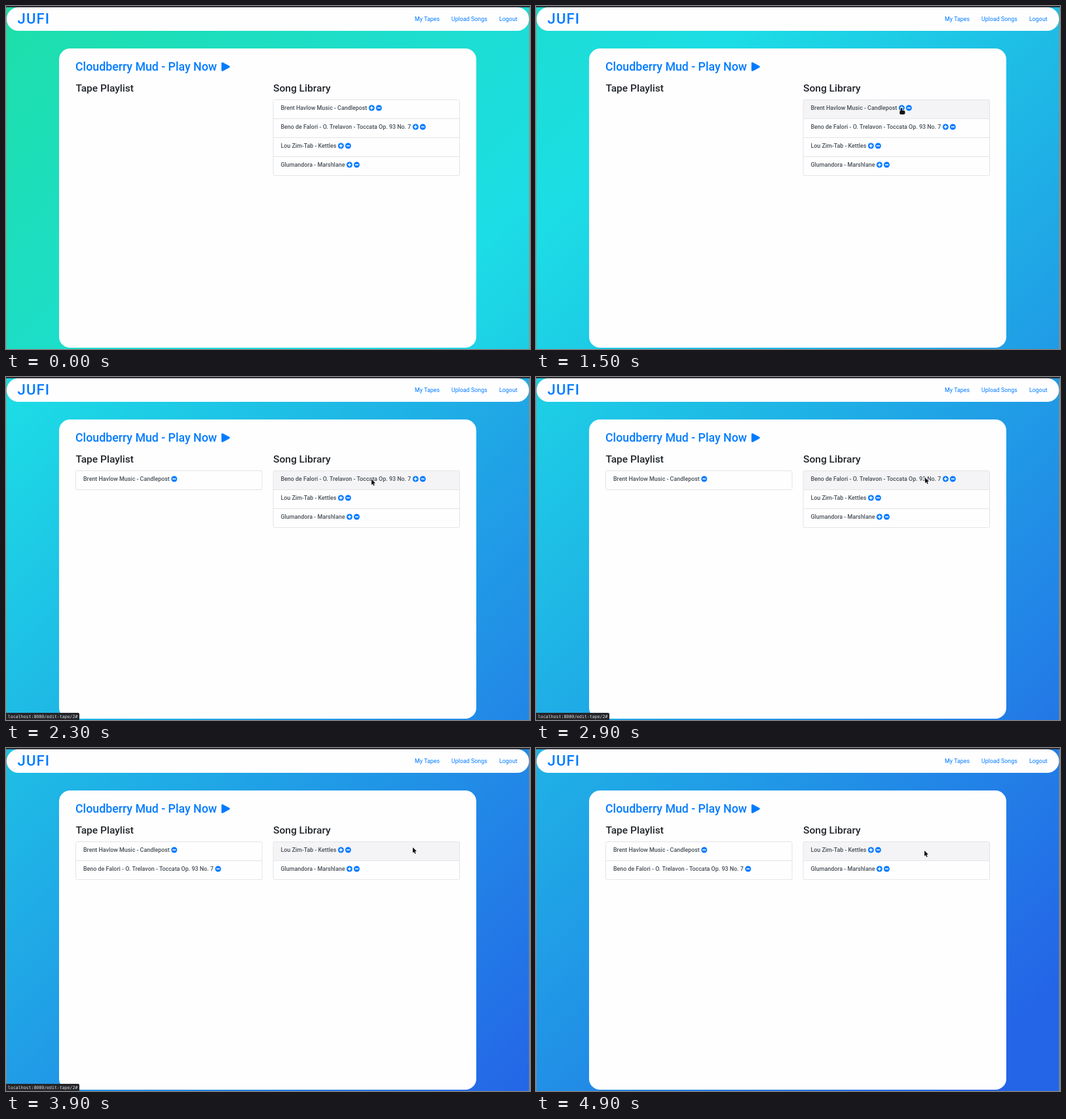
Write an HTML page with a canvas that moves like this. It is 800 px wide and 525 px high and loops after 5000 ms.

```html
<!DOCTYPE html>
<html lang="en">
<head>
<meta charset="utf-8">
<title>Tape editor</title>
<style>
html, body { margin: 0; width: 100%; height: 100%; overflow: hidden; }
canvas { display: block; width: 800px; height: 525px; }
</style>
</head>
<body>
<canvas id="stage" width="800" height="525"></canvas>
<script>
const ctx = document.getElementById('stage').getContext('2d');
const W = 800, H = 525, LOOP = 5000, STEP = 100;

// The page is laid out at 1440 px and shown at 800 px.
const REM = 16 * W / 1440;
const SANS = 'Roboto, sans-serif', MONO = '"DejaVu Sans Mono", monospace';
const BLUE = '#007bff', INK = '#212529', GREY = '#495057';
const LINE = '#e4e4e7', PAPER = '#fefeff', EDGE = 'rgba(150,144,124,.8)';

const songs = [
  'Brent Havlow Music - Candlepost',
  'Beno de Falori - O. Trelavon - Toccata Op. 93 No. 7',
  'Lou Zim-Tab - Kettles',
  'Glumandora - Marshlane'
];
const TAPE_X = 106.5, LIBRARY_X = 408;
const ROW = { top: 143.5, height: 29, width: 284.5, pad: 11.5, mid: 12.5 };

const ADDS = [1900, 3900];
const STATUS = { from: 1700, to: 4100 };

// Pointer: where it waits above the page, then each move it makes.
const ENTRY = { x: 620, y: -14 };
const moves = [
  { from: 400, ms: 300, x: 613, y: 35 },
  { from: 700, ms: 600, x: 558, y: 156.5 },
  { from: 2500, ms: 700, x: 621, y: 152 },
  { from: 4000, ms: 900, x: 593, y: 157 }
];

// Evenly spaced background stops, in page diagonals.
const tones = ['rgb(30,224,130)', 'rgb(28,221,229)', 'rgb(36,100,231)'];
const FIRST_TONE = -0.52, TONE_GAP = 1.34;

const clamp = v => Math.min(1, Math.max(0, v));
const mix = (a, b, k) => a + (b - a) * k;

function font(size, weight = 500, family = SANS) {
  ctx.font = `${weight} ${size}px ${family}`;
}

function text(str, x, y, size, color, weight, family) {
  font(size, weight, family);
  ctx.fillStyle = color;
  ctx.fillText(str, x, y);
}

function rect(x, y, w, h, color) {
  ctx.fillStyle = color;
  ctx.fillRect(x, y, w, h);
}

function panel(x, y, w, h, r, color) {
  ctx.beginPath();
  ctx.roundRect(x, y, w, h, r);
  ctx.fillStyle = color;
  ctx.fill();
}

// Distance from the start of a label to the middle of its first button.
function iconOffset(label) {
  font(REM);
  return ctx.measureText(label).width + 7;
}

function pointer(t) {
  if (t < moves[0].from) return null;
  return moves.reduce((p, m) => {
    const k = clamp((t - m.from) / m.ms);
    return { x: mix(p.x, m.x, k), y: mix(p.y, m.y, k) };
  }, ENTRY);
}

function background(t) {
  const s = t / 1000, shift = 0.42 * s - 0.0324 * s * s;
  const at = v => (v - shift) * (W + H) / 2;
  const a = at(FIRST_TONE), b = at(FIRST_TONE + TONE_GAP * (tones.length - 1));
  const g = ctx.createLinearGradient(a, a, b, b);
  tones.forEach((c, i) => g.addColorStop(i / (tones.length - 1), c));
  rect(0, 0, W, H, g);
  rect(W - 1.5, 2, 1.5, H, EDGE);
  rect(0, 2, 0.8, H, EDGE);
  rect(0, 0, W, 2, '#2c2c34');
}

function playIcon(x, y) {
  ctx.beginPath();
  ctx.moveTo(x, y - 5.5);
  ctx.lineTo(x + 10.3, y);
  ctx.lineTo(x, y + 5.5);
  ctx.closePath();
  ctx.lineWidth = 2.6;
  ctx.lineJoin = 'round';
  ctx.fillStyle = ctx.strokeStyle = BLUE;
  ctx.fill();
  ctx.stroke();
}

function page() {
  panel(1, 2, 797.5, 36, 18, PAPER);
  ctx.letterSpacing = '1.1px';
  text('JUFI', 17.5, 27.3, 2.5 * REM, BLUE);
  ctx.letterSpacing = '0px';
  text('My Tapes', 624, 23, REM, BLUE, 400);
  text('Upload Songs', 680, 23, REM, BLUE, 400);
  text('Logout', 753, 23, REM, BLUE, 400);

  panel(81, 65, 637, 458, 16.7, PAPER);
  text('Cloudberry Mud - Play Now', 106, 98.5, 2 * REM, BLUE);
  playIcon(330.2, 93);
  text('Tape Playlist', 106.5, 131, 1.75 * REM, INK);
  text('Song Library', 408, 131, 1.75 * REM, INK);
}

function button(x, y, plus) {
  panel(x - 4.5, y - 4.5, 9, 9, 4.5, BLUE);
  rect(x - 2.6, y - 0.75, 5.2, 1.5, '#fff');
  if (plus) rect(x - 0.75, y - 2.6, 1.5, 5.2, '#fff');
}

function list(labels, x, canAdd, mouse) {
  const { top, height, width, pad, mid } = ROW;
  if (!labels.length) return;
  labels.forEach((label, i) => {
    const y = top + i * height;
    const hover = mouse && mouse.x > x && mouse.x < x + width &&
      mouse.y > y && mouse.y < y + height;
    if (hover) rect(x, y, width, height, '#f4f4f6');
    text(label, x + pad, y + mid + 3.2, REM, GREY);
    const ix = x + pad + iconOffset(label);
    button(ix, y + mid, canAdd);
    if (canAdd) button(ix + 11, y + mid, false);
  });
  ctx.strokeStyle = LINE;
  ctx.lineWidth = 1;
  ctx.beginPath();
  ctx.roundRect(x, top, width, labels.length * height, 2);
  for (let i = 1; i < labels.length; i++) {
    ctx.moveTo(x, top + i * height);
    ctx.lineTo(x + width, top + i * height);
  }
  ctx.stroke();
}

function status() {
  panel(0, 514, 112, 11, [0, 2, 0, 0], '#25262b');
  text('localhost:8080/edit-tape/2#', 3, 522, 6.55, '#e6e6e6', 400, MONO);
}

function arrow() {
  const p = new Path2D('M0 0V8.6L2 6.9L3.3 9.9L4.7 9.2L3.4 6.3L6 6.1Z');
  return p;
}

function hand() {
  const p = new Path2D();
  p.roundRect(-1.2, -0.6, 2.4, 7, 1.2);
  p.roundRect(-2.8, 3.4, 8.2, 6.2, 1.8);
  return p;
}

function drawPointer(mouse, next) {
  const dx = mouse.x - (LIBRARY_X + ROW.pad + iconOffset(next));
  const dy = mouse.y - (ROW.top + ROW.mid);
  const shape = Math.hypot(dx, dy) < 8 ? hand() : arrow();
  ctx.save();
  ctx.translate(mouse.x, mouse.y);
  ctx.lineWidth = 1.2;
  ctx.strokeStyle = 'rgba(255,255,255,.8)';
  ctx.stroke(shape);
  ctx.fillStyle = '#111';
  ctx.fill(shape);
  ctx.restore();
}

function draw(now) {
  const t = Math.floor((now % LOOP) / STEP) * STEP;
  const added = ADDS.filter(a => t >= a).length;
  const mouse = pointer(t);
  background(t);
  page();
  list(songs.slice(0, added), TAPE_X, false, mouse);
  list(songs.slice(added), LIBRARY_X, true, mouse);
  if (t >= STATUS.from && t < STATUS.to) status();
  if (mouse) drawPointer(mouse, songs[added]);
}

let start;
function tick(now) {
  start ??= now;
  draw(now - start);
  requestAnimationFrame(tick);
}
draw(0);
requestAnimationFrame(tick);
</script>
</body>
</html>
```
